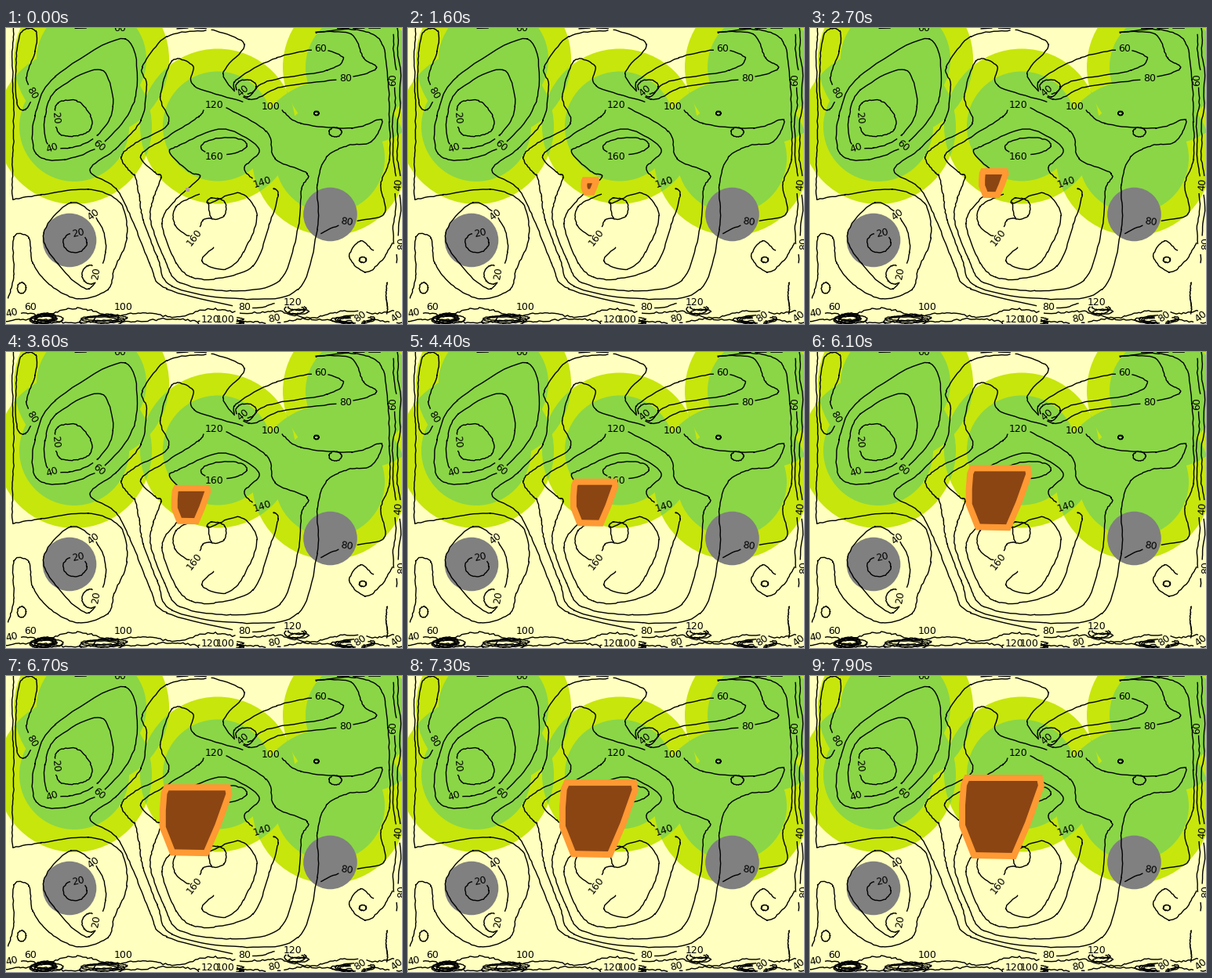
Write a matplotlib script that moves like this. It is 505 px wide and 378 px high and loops after 8000 ms.

```python
from itertools import combinations

import numpy as np
import matplotlib.pyplot as plt
from matplotlib.animation import FuncAnimation
from matplotlib.patches import Circle, Polygon, Rectangle

W, H, DPI = 505, 378, 100
PX = 72 / DPI
FRAMES, STEP = 80, 100
OUTER, INNER, TOWER = 99, 70, 34.3
LIME, GREEN, GREY = "#c7e60c", "#8ad647", "#808080"
ORANGE, BROWN = "#ff9933", "#8b4513"

plt.rcParams["font.family"] = "DejaVu Sans"
rng = np.random.default_rng(5)
fig = plt.figure(figsize=(W / DPI, H / DPI), dpi=DPI)
ax = fig.add_axes([0, 0, 1, 1])
ax.set(xlim=(0, W), ylim=(H, 0))
ax.axis("off")
fig.patch.set_facecolor("#ffffbf")


def disc(centre, radius, color, z):
    return ax.add_patch(Circle(centre, radius, fc=color, ec="none", zorder=z))


# Where two lime rings overlap, the ground turns green as well.
forests = [(87, 126), (109, 40), (270, 125.5), (413, 166), (452, 50)]
for c in forests:
    disc(c, OUTER, LIME, 1)
    disc(c, INNER, GREEN, 2)
for a, b in combinations(forests, 2):
    disc(a, OUTER, GREEN, 2).set_clip_path(Circle(b, OUTER, transform=ax.transData))
for c in [(81, 271), (413.5, 238)]:
    disc(c, TOWER, GREY, 3)

# Height labels: level -> (x, y, angle)
LABELS = {
    20: [(63, 115, -85), (92, 262, 12), (115, 314, 80)],
    40: [(59, 153, 18), (111, 238, 38), (302, 80, 40), (501, 200, 85), (7, 364, 12), (498, 368, 38)],
    60: [(145, 1, 0), (118, 150, -40), (401, 26, 0), (494, 66, 90), (31, 356, 0)],
    80: [(33, 83, -60), (433, 64, 0), (505, 275, 90), (435, 248, -8), (304, 357, 0),
         (342, 371, 12), (452, 369, 35)],
    100: [(338, 101, 0), (150, 356, 0), (280, 373, 0)],
    120: [(266, 99, 0), (366, 350, 0), (261, 373, 0)],
    140: [(327, 197, 18)],
    160: [(266, 164, 0), (240, 267, 52)],
}
for level, spots in LABELS.items():
    for x, y, angle in spots:
        ax.text(x, y, str(level), size=12.5 * PX, rotation=angle, ha="center",
                va="center", zorder=5, clip_on=True)


def line(xy, rough=0.5):
    """Draw a slightly rough line that leaves room for the labels."""
    xy = xy + rng.uniform(-rough, rough, xy.shape)
    for level, spots in LABELS.items():
        half = 4 * len(str(level)) + 2
        for x, y, angle in spots:
            a = np.radians(angle)
            dx, dy = (xy - (x, y)).T
            along = dx * np.cos(a) - dy * np.sin(a)
            across = dx * np.sin(a) + dy * np.cos(a)
            xy[(abs(along) < half) & (abs(across) < 6)] = np.nan
    ax.plot(*xy.T, color="k", lw=1.4 * PX, zorder=4)


def contour(points, closed=False):
    """Catmull-Rom curve through a few key points."""
    p = np.array(points, float)
    p = np.vstack([p[-1:], p, p[:2]]) if closed else np.vstack([p[:1], p, p[-1:]])
    t = np.linspace(0, 1, 12)[:, None]
    line(np.vstack([
        0.5 * (2 * b + (c - a) * t + (2 * a - 5 * b + 4 * c - d) * t**2
               + (3 * b - a - 3 * c + d) * t**3)
        for a, b, c, d in zip(p, p[1:], p[2:], p[3:])]))


def ring(cx, cy, rx, ry, lean=0.0, start=0, stop=360):
    a = np.radians(np.linspace(start, stop, 50))
    line(np.column_stack([cx + rx * np.cos(a) + lean * np.sin(a), cy + ry * np.sin(a)]))


def mix(a, b, u):
    return np.array(a) * (1 - u) + np.array(b) * u


def upright(x, y0, y1, sway):
    y = np.linspace(y0, y1, 60)
    line(np.column_stack([x + sway * np.sin(y / 23 + x) + 0.4 * sway * np.sin(y / 7), y]))


# Upper left hill: three nested loops
peak = [(66, 96), (90, 93), (108, 112), (107, 130), (88, 138), (68, 135), (63, 115)]
foot = [(63, 62), (152, 14), (165, 88), (126, 145), (75, 168), (38, 160), (37, 112)]
for u in (0, 0.5, 1):
    contour(mix(peak, foot, u), closed=True)
contour([(38, 4), (37, 30), (26, 64), (34, 84), (25, 104), (14, 95), (13, 40), (20, 5)], closed=True)

# Lower left basin
contour([(9, 219), (45, 213), (105, 206), (146, 224), (154, 268), (138, 308), (130, 334),
         (92, 346), (55, 327), (34, 300), (29, 268), (10, 267), (10, 315), (3, 345)])
contour([(83, 223), (117, 246), (127, 286), (106, 333), (66, 301), (48, 262)], closed=True)
ring(88, 274, 15, 13)
ring(108, 315, 11, 12, start=60, stop=290)
ring(20, 332, 5.5, 7)

# Middle bowl: left shoulder, shared basin, right shoulder
rim = [(147, 165), (160, 185), (165, 190), (170, 215), (175, 245), (193, 292), (212, 330),
       (300, 346), (372, 334), (397, 257), (397, 200)]
floor = [(209, 160), (235, 184), (247, 191), (215, 221), (199, 250), (217, 300), (237, 318),
         (268, 320), (315, 304), (336, 250), (347, 213)]
left = [[(302, 94), (240, 74), (238, 48), (212, 42), (197, 88), (207, 122), (165, 147)],
        [(253, 99), (246, 113), (204, 140)],
        [(314, 192), (304, 178), (323, 154), (276, 129), (221, 150)]]
right = [[(409, 165), (436, 150), (466, 145), (479, 117), (441, 128), (376, 122), (350, 103)],
         [(384, 186), (343, 167), (332, 132), (278, 100)],
         [(341, 205)]]
for u, start, end in zip((0, 0.4, 1), left, right):
    contour([*start, *mix(rim, floor, u), *end])
contour([(255, 3), (205, 11), (174, 50), (179, 72), (172, 118), (140, 154), (107, 182),
         (140, 205), (161, 245), (183, 300), (205, 333), (304, 357), (342, 352)])
ring(278, 151, 29, 11, lean=-4)
contour([(258, 223), (262, 243), (278, 240), (279, 222), (262, 217), (259, 224), (298, 211),
         (320, 240), (303, 286), (280, 308), (250, 298), (265, 280)])
contour([(246, 212), (217, 228), (216, 252), (240, 267), (251, 246), (262, 243)])

# Upper right valley
contour([(262, 2), (304, 21), (277, 59), (310, 91), (352, 75), (433, 64), (472, 52),
         (456, 38), (440, 8), (395, 5)])
contour([(401, 26), (345, 38), (291, 69), (308, 88), (333, 68), (410, 54), (430, 38), (401, 26)])
ring(306, 75, 13, 9)
ring(420, 133, 8, 6)
ring(396, 109, 3, 2.5)

# Right side and borders
contour([(395, 6), (445, 2), (478, 17), (487, 66), (489, 120), (489, 168), (478, 200),
         (482, 238), (435, 248), (402, 262)])
contour([(493, 275), (478, 298), (458, 312), (438, 292), (452, 272), (468, 284)])
ring(455, 296, 4.5, 3.5)
for x, y0, y1, sway in [(9, 0, 219, 1), (495, 8, 275, 2), (501, 0, 300, 2), (483, 325, 365, 3)]:
    upright(x, y0, y1, sway)
for x in (95, 225, 248, 430, 450, 470):
    line(np.array([(x - 7.0, 0.5), (x + 7.0, 0.5)]))

# Crowded bottom edge
x = np.linspace(0, W, 160)
for y, amp in [(364, 6), (374, 3)]:
    line(np.column_stack([x, y + amp * np.sin(x / 19) * np.sin(x / 47 + y)]), rough=1.2)
for cx, cy, half, count in [(50, 372, 26, 6), (125, 373, 30, 4), (275, 374, 28, 5),
                            (370, 360, 18, 3), (440, 372, 25, 4)]:
    for k in range(count):
        ring(cx + rng.uniform(-6, 6), cy + rng.uniform(-3, 4), half * rng.uniform(0.5, 1),
             rng.uniform(2, 6), lean=rng.uniform(-4, 4))

# The fire grows evenly from its origin behind a flame front of constant width.
ORIGIN = np.array([230, 206])
END = np.array([(200, 130), (293, 130), (295, 140), (278, 188), (260, 230), (209, 229),
                (194, 191), (194, 165), (196, 139)])
FRONT, DELAY, LAST = 8, 0.45, 7.9

spot = ax.add_patch(Rectangle((229, 204), 5, 5, fc="#b3a08c", ec="none", zorder=6))
fire = ax.add_patch(Polygon(END, fc=BROWN, ec=ORANGE, joinstyle="miter", zorder=7))


def draw(i):
    t = i * STEP / 1000
    grown = max(0.03, (t - DELAY) / (LAST - DELAY))
    spot.set_visible(i == 0)
    fire.set_visible(i > 0)
    fire.set_xy(ORIGIN + grown * (END - ORIGIN))
    fire.set_linewidth(FRONT * min(1, 0.5 + t) * PX)
    return spot, fire


anim = FuncAnimation(fig, draw, frames=FRAMES, interval=STEP, repeat=True, repeat_delay=0)
plt.show()
```
